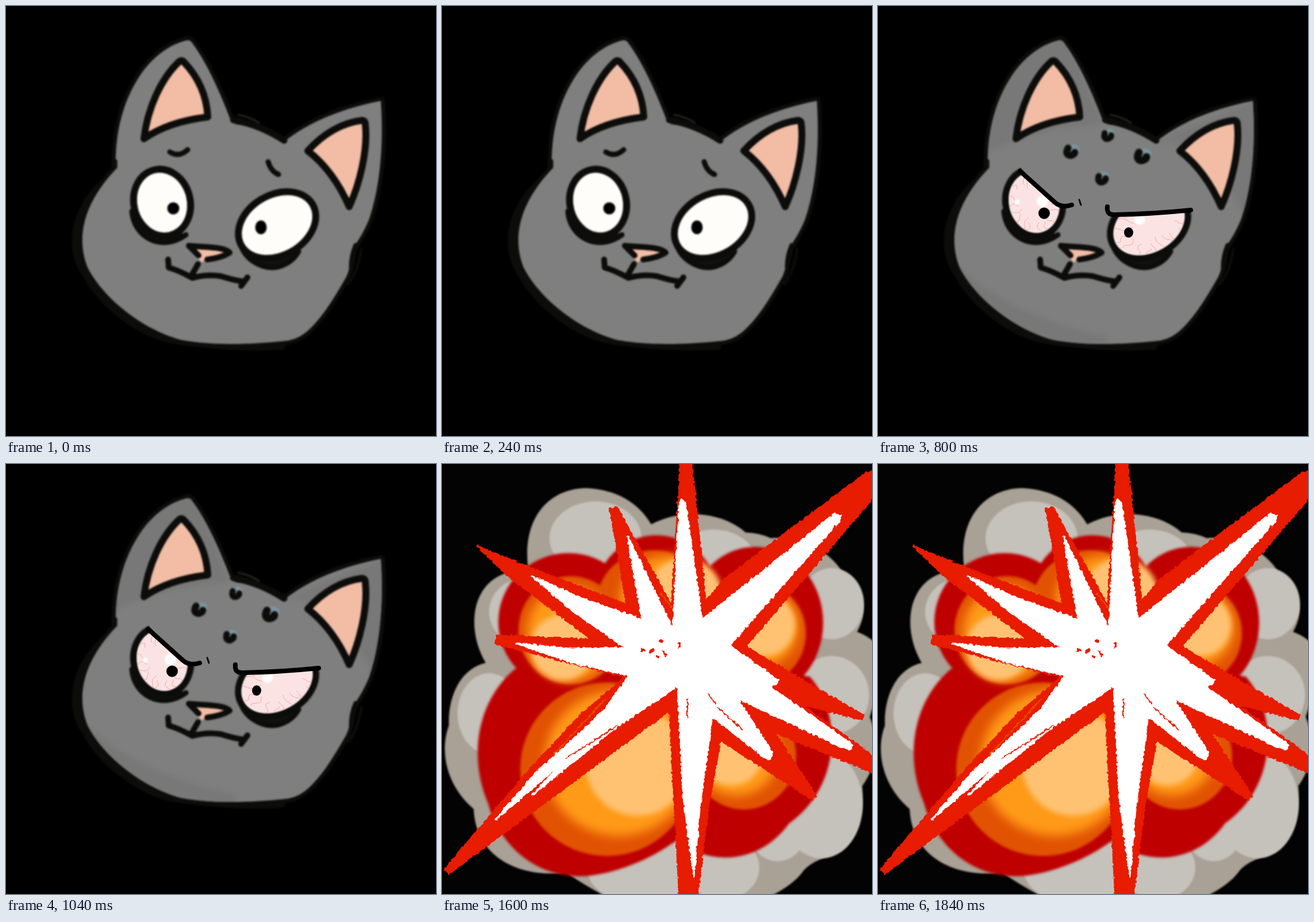
An HTML page that plays this animation: 748 px wide and 748 px high, repeating every 2000 ms.

```html
<!DOCTYPE html>
<html lang="en">
<head>
<meta charset="utf-8">
<title>Cat loses its temper</title>
<style>
  html, body { margin: 0; width: 100%; height: 100%; overflow: hidden; background: #000; }
  svg { display: block; width: 100vw; height: 100vh; }
  .ink { fill: none; stroke: #0c0c0a; stroke-linecap: round; stroke-linejoin: round; }
  .ink.ear { fill: #f2bca5; stroke-width: 12px; }
  .ink.bag { fill: #111110; stroke-width: 9px; }
  .soft { filter: url(#soft); }

  /* Each mood is a hard on/off window inside the two-second loop. */
  .worried, .angry, .shaded, .bloodshot, .dazed, .boom { animation: 2s step-end infinite; }
  .worried { animation-name: worried; }
  .angry { animation-name: angry; }
  .shaded { animation-name: shaded; }
  .bloodshot { animation-name: bloodshot; }
  .dazed { animation-name: dazed; }
  .boom { animation-name: boom; }
  @keyframes worried { 0% { opacity: 1 } 20%, 100% { opacity: 0 } }
  @keyframes angry { 0% { opacity: 0 } 20% { opacity: 1 } 60%, 100% { opacity: 0 } }
  @keyframes shaded { 0% { opacity: 0 } 20%, 100% { opacity: 1 } }
  @keyframes bloodshot { 0% { opacity: 0 } 40% { opacity: 1 } 80%, 100% { opacity: 0 } }
  @keyframes dazed { 0% { opacity: 0 } 60% { opacity: 1 } 80%, 100% { opacity: 0 } }
  @keyframes boom { 0% { opacity: 0 } 80%, 100% { opacity: 1 } }
</style>
</head>
<body>
<svg viewBox="0 0 748 748">
  <defs>
    <filter id="soft" x="-5%" y="-5%" width="110%" height="110%" color-interpolation-filters="sRGB"><feGaussianBlur stdDeviation="1.4"/></filter>
    <filter id="haze" x="-10%" y="-10%" width="120%" height="120%" color-interpolation-filters="sRGB"><feGaussianBlur stdDeviation="2"/></filter>
    <filter id="glow" x="-20%" y="-20%" width="140%" height="140%" color-interpolation-filters="sRGB"><feGaussianBlur stdDeviation="5"/></filter>
    <filter id="flare" x="-20%" y="-20%" width="140%" height="140%" color-interpolation-filters="sRGB"><feGaussianBlur stdDeviation="9"/></filter>
    <filter id="chalk" filterUnits="userSpaceOnUse" x="-20" y="-20" width="788" height="788">
      <feTurbulence type="fractalNoise" baseFrequency=".2" numOctaves="1" seed="4"/>
      <feDisplacementMap in="SourceGraphic" scale="7" xChannelSelector="R" yChannelSelector="G"/>
    </filter>
    <path id="head" d="M191 284 C189 220 204 165 233 121 C255 88 285 67 313 60 Q319 58 323 63 C350 99 372 150 389 194 Q393 204 401 206 C432 210 460 221 484 236 C530 199 590 177 652 165 C657 235 652 310 632 370 C624 390 614 406 606 418 C600 432 600 455 592 471 C572 506 548 547 520 569 Q503 582 482 583 C430 588 365 592 305 581 C240 564 170 510 142 455 C122 405 133 345 191 284Z"/>
    <ellipse id="eyeL" rx="43" ry="52.5" transform="translate(271.5 342) rotate(-14)"/>
    <ellipse id="eyeR" rx="65.5" ry="46.5" transform="translate(471.5 381) rotate(-30)"/>
    <clipPath id="inHead"><use href="#head"/></clipPath>
    <clipPath id="inL"><use href="#eyeL"/></clipPath>
    <clipPath id="inR"><use href="#eyeR"/></clipPath>
    <g id="drop">
      <ellipse cx="3" cy="-2" rx="10" ry="10" fill="#7c959d"/>
      <path class="ink" d="M-6 -4 C-9 6 -2 9 3 5 Q6 3 6 0" stroke-width="11"/>
    </g>
  </defs>

  <g class="soft">
    <use href="#head" class="ink" stroke-width="14"/>
    <path class="ink" d="M180 298 C114 350 107 425 139 468 C170 525 240 575 300 583 Q400 597 480 592" stroke-width="12"/>
    <path class="ink" d="M618 423 Q613 460 596 483" stroke="#34343a" stroke-width="5"/>
    <path d="M403 189 Q425 193 441 204" fill="none" stroke="#252525" stroke-width="3"/>
    <use href="#head" fill="#7f7f7f"/>
    <g class="shaded" clip-path="url(#inHead)">
      <g fill="#787878" filter="url(#glow)">
        <path d="M180 260 Q260 215 390 205 L320 30 L160 100Z"/>
        <path d="M484 236 Q570 225 640 370 L690 150Z"/>
        <path d="M135 450 Q230 540 400 575 L400 620 L110 620Z"/>
      </g>
    </g>
    <path class="ink" d="M395 198 Q442 207 484 234" stroke-width="11"/>
    <path class="ink" d="M190 270 V280 M608 416 Q600 434 600 455" stroke-width="7"/>

    <path class="ink ear" d="M240 231 C246 178 270 126 301 97 Q305 93 309 97 C333 122 349 155 351 193 C310 198 272 208 240 231Z"/>
    <path class="ink ear" d="M525 252 C552 222 585 203 619 199 Q625 199 625 206 C630 250 615 310 597 349 C580 310 556 276 525 252Z"/>

    <path class="ink bag" d="M219 357 C222 402 270 429 313 398"/>
    <path class="ink bag" d="M407 409 C412 440 445 459 472 454 Q497 448 509 427"/>
    <g class="ink" stroke-width="24"><use href="#eyeL"/><use href="#eyeR"/></g>
    <g fill="#fffdf9"><use href="#eyeL"/><use href="#eyeR"/></g>

    <path fill="#f2bca5" d="M328 419 L383 428 L350 438 L341 446 L333 438Z"/>
    <path class="ink" d="M335 434 L318 417 C342 420 380 418 389 429 Q375 438 350 441" stroke-width="10"/>
    <path class="ink" d="M282 441 L283 455 Q301 460 324 473 Q350 466 374 470 Q396 477 411 479 M420 472 L409 487 M334 449 L322 470" stroke-width="10"/>
  </g>

  <g class="bloodshot">
    <g class="soft">
      <g fill="#fbe3e3"><use href="#eyeL"/><use href="#eyeR"/></g>
    </g>
    <g id="veinsL" clip-path="url(#inL)"/>
    <g id="veinsR" clip-path="url(#inR)"/>
    <g class="soft">
      <g fill="#fff"><circle cx="286" cy="340" r="10"/><circle cx="242" cy="341" r="4.5"/><circle cx="455" cy="371" r="9.5"/></g>
      <use href="#drop" transform="translate(336 253) rotate(14) scale(1.1)"/>
      <use href="#drop" transform="translate(400 225) scale(.95)"/>
      <use href="#drop" transform="translate(460 261) rotate(12) scale(1.2)"/>
      <use href="#drop" transform="translate(390 300)"/>
    </g>
  </g>

  <g class="worried soft">
    <circle cx="291" cy="352" r="10.5"/><ellipse cx="443.5" cy="385" rx="10" ry="12"/>
    <path class="ink" d="M285 254 Q301 264 316 250 M456 271 Q461 288 474 293" stroke-width="9"/>
  </g>
  <g class="angry">
    <path d="M250 284 L318 349 L336 344 V268 H245Z M397 345 L402 363 L547 355 L552 308 L400 312Z" fill="#7f7f7f"/>
    <circle cx="289" cy="360.5" r="10"/><ellipse cx="436" cy="394" rx="8" ry="9"/>
    <path class="ink" style="stroke:#000" d="M247 287 L307 341 Q319 352 337 346 M399 349 Q397 364 412 363 Q475 362 544 355" stroke-width="8"/>
    <path class="ink" d="M350 337 L353 346" stroke-width="3"/>
  </g>
  <g class="dazed soft" fill="#191918">
    <circle cx="264" cy="327" r="10.5"/><ellipse cx="489.5" cy="368" rx="13" ry="12"/>
  </g>

  <g class="boom">
    <rect width="748" height="748" fill="#030303"/>
    <path class="soft" fill="#a9a195" d="M150 183 C138 90 190 41 253 42 C303 45 341 66 364 105 C420 75 490 85 528 119 Q553 120 572 129 C640 124 690 165 706 206 C738 225 740 260 722 292 C758 305 770 330 770 360 L744 440 C765 490 750 535 731 560 C735 620 715 668 680 680 Q645 690 630 706 C610 735 575 750 545 765 H310 Q255 738 215 710 C160 720 60 700 55 600 C8 560 -5 500 12 455 C10 400 35 355 76 346 C43 290 50 215 105 192 Q125 185 150 183Z"/>
    <g fill="#c5c1bb" class="soft">
      <ellipse cx="267" cy="129" rx="80" ry="64"/><ellipse cx="472" cy="165" rx="72" ry="51"/>
      <ellipse cx="140" cy="257" rx="58" ry="57"/><ellipse cx="82" cy="434" rx="55" ry="70"/>
      <ellipse cx="678" cy="243" rx="56" ry="62"/><ellipse cx="678" cy="402" rx="65" ry="68"/>
      <ellipse cx="660" cy="592" rx="72" ry="94"/><ellipse cx="584" cy="636" rx="50" ry="55"/>
      <ellipse cx="488" cy="702" rx="64" ry="56"/><ellipse cx="345" cy="705" rx="92" ry="60"/>
    </g>
    <g fill="#be0000" filter="url(#haze)">
      <ellipse cx="220" cy="275" rx="122" ry="120"/><ellipse cx="373" cy="234" rx="108" ry="110"/>
      <ellipse cx="545" cy="276" rx="118" ry="132"/>
      <path d="M125 358 C60 415 46 510 80 590 C105 680 185 728 265 715 C325 706 385 675 420 645 L450 400 L300 250Z"/>
      <path d="M640 370 C700 440 690 565 604 625 C560 685 495 696 440 674 L400 330Z"/>
    </g>
    <g fill="#e15202" filter="url(#haze)">
      <ellipse cx="224" cy="289" rx="91" ry="94"/><ellipse cx="368" cy="245" rx="100" ry="95"/>
      <ellipse cx="548" cy="295" rx="85" ry="88"/><ellipse cx="287" cy="531" rx="151" ry="151"/>
      <ellipse cx="525" cy="508" rx="91" ry="93"/>
    </g>
    <g fill="#ff9a18" filter="url(#flare)">
      <ellipse cx="222" cy="295" rx="74" ry="82"/><ellipse cx="395" cy="235" rx="85" ry="75"/>
      <ellipse cx="550" cy="285" rx="69" ry="68"/><ellipse cx="308" cy="520" rx="130" ry="127"/>
      <ellipse cx="512" cy="503" rx="74" ry="74"/>
    </g>
    <g fill="#ffc273" filter="url(#glow)">
      <ellipse cx="210" cy="319" rx="56" ry="57"/><ellipse cx="422" cy="230" rx="65" ry="66"/>
      <ellipse cx="560" cy="280" rx="54" ry="54"/><ellipse cx="340" cy="521" rx="90" ry="91"/>
      <ellipse cx="503" cy="505" rx="55" ry="54"/>
    </g>
    <g filter="url(#chalk)" stroke-linejoin="round">
      <path fill="#e81a00" stroke="#e81a00" stroke-width="4" d="M400 248 L416 -10 H433 L458 240 L492 200 L735 18 L755 8 V52 L527 318 L732 437 L729 444 L620 416 L755 512 V538 L577 466 L650 577 L644 583 L484 480 L462 600 L443 760 H414 L396 428 L12 712 L5 705 L150 535 L240 438 L320 370 L95 313 V299 L262 306 L115 194 L62 143 L150 180 L322 245 L293 79 L304 76Z"/>
      <path fill="#fff" stroke="#fff" stroke-width="3" d="M402 288 L413 70 Q418 54 424 72 L452 271 L684 86 L694 90 L690 100 L500 316 L585 376 L580 384 L568 386 L602 410 L715 489 L710 496 L690 490 L514 408 L575 502 L570 514 L560 510 L470 439 L448 600 L438 717 L420 580 L410 386 L300 460 L156 577 L215 514 L93 619 L165 535 L222 485 L285 425 L325 368 L225 345 L130 312 L220 321 L320 320 L230 258 L156 195 L240 232 L348 271 L323 126Z"/>
      <g fill="none" stroke="#e81a00" stroke-linecap="round" stroke-width="2">
        <path d="M480 424 L522 462 M463 400 L476 416 M427 408 V442 M216 512 L305 455"/>
        <path d="M348 323 H352 M362 327 L368 323 M374 335 H376 M386 326 L389 333 M379 308 H383 M413 312 V318" stroke-width="4"/>
      </g>
      <path fill="none" stroke="#e15202" stroke-width="2" d="M285 408 L192 508 M380 225 L401 250"/>
    </g>
  </g>
</svg>
<script>
  let seed = 11;
  const random = () => (seed = (seed * 16807) % 2147483647) / 2147483647;

  // Wavy capillaries creeping from the rim of an eye toward its middle.
  function addVeins(id, cx, cy, rx, ry, count) {
    let d = '';
    for (let i = 0; i < count; i++) {
      const angle = (i + random() * 0.7) / count * 2 * Math.PI;
      const reach = 0.25 + random() * 0.4;
      const phase = random() * 6;
      for (let step = 0; step <= 8; step++) {
        const r = 1.08 - reach * step / 8;
        const a = angle + Math.sin(phase + step * 0.8) * 0.08;
        d += `${step ? 'L' : 'M'}${(cx + rx * r * Math.cos(a)).toFixed(1)} ${(cy + ry * r * Math.sin(a)).toFixed(1)}`;
      }
    }
    const path = document.createElementNS('http://www.w3.org/2000/svg', 'path');
    path.setAttribute('d', d);
    path.setAttribute('fill', 'none');
    path.setAttribute('stroke', '#f2a5a3');
    path.setAttribute('stroke-linejoin', 'round');
    document.getElementById(id).append(path);
  }
  addVeins('veinsL', 272, 342, 45, 53, 19);
  addVeins('veinsR', 472, 381, 62, 51, 20);
</script>
</body>
</html>
```
